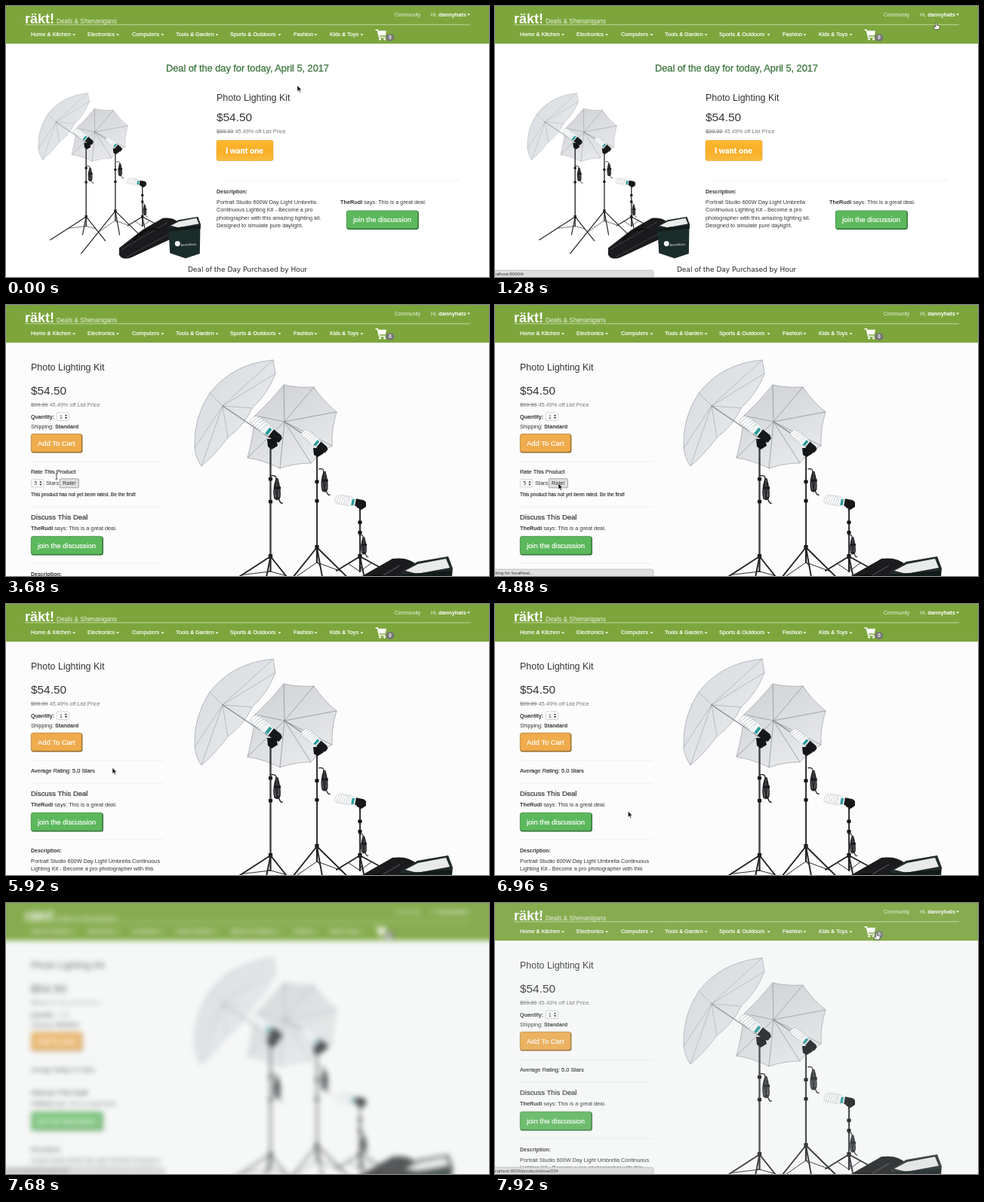
Animation, 640 px wide and 360 px high, one loop 8 s. Source, as an HTML page:

```html
<!DOCTYPE html>
<html lang="en">
<head>
<meta charset="utf-8">
<title>Deal of the day</title>
<style>
html, body { margin: 0; width: 100%; height: 100%; overflow: hidden; background: #fff; }
svg { display: block; width: 640px; height: 360px; }
text { font-family: "Liberation Sans", Arial, sans-serif; fill: #333; }
.b { font-weight: bold; }
.m { stroke: #333; stroke-width: .2; }
.w { fill: #fff; }
.wm { fill: #fff; stroke: #fff; stroke-width: .2; }
.mute { fill: #777; }
.hr { stroke: #e9e9e9; stroke-width: .7; }
</style>
</head>
<body>
<svg id="stage" viewBox="0 0 640 360" xmlns="http://www.w3.org/2000/svg"></svg>
<script>
const LOOP = 8000;
const HOST = 'localhost:8000';
const USER = 'dannyhats', POSTER = 'TheRudi', SHOP = 'räkt!';

const text = (x, y, size, str, cls = '', extra = '') =>
  `<text x="${x}" y="${y}" font-size="${size}" class="${cls}" ${extra}>${str}</text>`;
const bold = s => `<tspan class="b">${s}</tspan>`;
const mid = 'text-anchor="middle"';
const line = (x1, y1, x2, y2, color, w) =>
  `<path d="M${x1} ${y1}L${x2} ${y2}" stroke="${color}" stroke-width="${w}" fill="none" stroke-linecap="round"/>`;
const rule = (x1, x2, y) => `<path class="hr" d="M${x1} ${y}H${x2}"/>`;
const caret = x => `<path fill="#fff" d="M${x - 2} 37.2h4l-2 2.2z"/>`;

function button(x, y, w, h, fill, edge, label) {
  return `<rect x="${x + .4}" y="${y + .4}" width="${w}" height="${h}" rx="3" fill="${edge}"/>
    <rect x="${x + .2}" y="${y + .2}" width="${w - .9}" height="${h - .9}" rx="2.8" fill="${fill}" stroke="${edge}" stroke-width=".4"/>` +
    text(x + w / 2 - .2, y + h / 2 + 3.1, 9.45, label, 'wm', mid);
}
const joinButton = (x, y) => button(x, y, 95.5, 25, '#5cb85c', '#2f6b33', 'join the discussion');

function select(x, y, w, label) {
  const ax = x + w - 4;
  return `<rect x="${x}" y="${y}" width="${w}" height="10.5" rx="2" fill="#fff" stroke="#b5b5b5" stroke-width=".6"/>` +
    text(x + 4, y + 7.8, 6.8, label) +
    `<path fill="#333" d="M${ax - 1.6} ${y + 4.6}h3.2l-1.6-2.4zM${ax - 1.6} ${y + 6}h3.2l-1.6 2.4z"/>`;
}

// ---- product picture, in the large page's coordinates ----
function canopy(points, hub, pull, fill) {
  let d = `M${points[0]}`, ribs = '';
  points.forEach((p, i) => {
    const q = points[(i + 1) % points.length];
    const c = [0, 1].map(k => { const m = (p[k] + q[k]) / 2; return m + (hub[k] - m) * pull; });
    d += `Q${c} ${q}`;
    ribs += line(...hub, ...p, '#85898f', .7);
  });
  return `<path d="${d}Z" fill="${fill}" stroke="#a4a7ad" stroke-width=".8"/>${ribs}`;
}

function lamp(x, y, angle, size) {
  let coils = '';
  for (let i = 0; i < 6; i++) {
    const cx = -36 + i * 3.7;
    coils += `<ellipse cx="${cx}" cy="0" rx="2.6" ry="${i ? 8 : 6.5}" fill="#fff" stroke="#b9bfc4" stroke-width=".8" transform="rotate(14 ${cx} 0)"/>`;
  }
  return `<g transform="translate(${x} ${y}) rotate(${angle}) scale(${size})">${coils}
    <path d="M-18-8L-7-5V5L-18 8Z" fill="#f2f5f5" stroke="#c3c8cc" stroke-width=".5"/>
    <path d="M-13-4L-9-4V5L-13 6Z" fill="#2a9a9a"/>
    <path d="M-7-5.5H5L9-3V4L4 6H-7Z" fill="#17181a"/></g>`;
}

function stand(x, top, hub, legs) {
  return line(x, top, x, hub + 20, '#232427', 2.2) + line(x - .4, top + 8, x - .4, hub, '#707377', .6) +
    [.3, .5].map(k => {
      const y = top + (hub - top) * k;
      return `<rect x="${x - 2.6}" y="${y}" width="5.2" height="4.5" rx="1" fill="#141517"/>`;
    }).join('') +
    `<rect x="${x - 2.6}" y="${hub - 3}" width="5.2" height="6" fill="#141517"/>` +
    legs.map(p => line(x, hub, ...p, '#232427', 1.9) +
      line(x, hub + 20, x + (p[0] - x) * .5, hub + (p[1] - hub) * .5, '#2b2c2f', 1)).join('');
}

const cable = (x, y, s) => `<g transform="translate(${x} ${y}) scale(${s})" fill="none" stroke="#1a1b1d" stroke-width="1.3">
  <path d="M-8-18Q0-20-1-12"/><path d="M-1-14Q-6 0-3 12Q2 16 4 10Q5 0 1-14Z" fill="#55575a"/>
  <path d="M-1-12Q-3 2 1 12M1-10Q2 4-1 13M2 10Q4 20 8 18"/><path d="M-4-2h9" stroke-width="3.500"/></g>`;

const picture = `
  ${canopy([[368, 106], [408, 109], [438, 142], [432, 187], [404, 210], [363, 217], [320, 203], [330, 147]], [369, 155], .06, 'url(#shadeB)')}
  <path d="M354 73Q300 78 270 117Q248 150 250 190Q252 205 259 214Q278 198 294 176Q316 160 326 137Q347 118 357 91Z"
    fill="url(#shadeA)" stroke="#a8abb1" stroke-width=".8"/>
  ${[[354, 73], [357, 91], [326, 137], [294, 176], [259, 214], [250, 190], [270, 117]].map(p => line(287, 134, ...p, '#9b9fa5', .6)).join('')}
  ${line(287, 134, 352, 178, '#85898f', 1.3)}${line(369, 155, 412, 184, '#85898f', 1.3)}
  ${stand(469, 266, 334, [[438, 353], [500, 351], [474, 358]])}
  ${stand(350.5, 184, 334, [[275, 383], [391, 385], [343, 372]])}
  ${stand(412, 194, 322, [[340, 412], [477, 386], [421, 372]])}
  <path d="M346 178h12l2 9-8 5-5-4zM407 190h12l2 7-8 5-5-3z" fill="#141517"/>
  <path d="M463 262h14l0 6-6 4-6-3z" fill="#141517"/>
  ${lamp(357, 174, 38, 1)}${lamp(419, 189, 40, .85)}${lamp(469, 263, 10, .85)}
  ${cable(359, 245, 1)}${cable(422, 235, .95)}${cable(474, 320, .8)}
  <path d="M420 400L470 361 512 337Q534 334 545 346L536 378 446 420Q426 427 420 414Z" fill="#1b1b1d"/>
  <path d="M424 404L522 346M436 419L534 366" stroke="#4c4d50" stroke-width="1.2" fill="none"/>
  <path d="M450 384Q478 352 505 362" stroke="#0c0c0d" stroke-width="3" fill="none"/>
  <path d="M524 354L545 341 586 334 592 350 591 360 525 362Z" fill="#232a2a"/>
  <path d="M529 353L546 344 583 337 588 349 545 357Z" fill="#e9eaea"/>
  <path d="M524 358L591 353 590 412 560 422 527 411Z" fill="#1b2d2b"/>
  <path d="M524 358L591 353V359L525 365Z" fill="#111b1a"/>
  <circle cx="543" cy="391" r="5.5" fill="#f4f6f6"/>
  ${text(550, 396, 6.2, 'BentoWicks', 'w', 'transform="rotate(-3 550 396)"')}`;

// ---- page parts ----
const menu = [['Home &amp; Kitchen', 33, 90], ['Electronics', 108, 148], ['Computers', 167, 207.5],
  ['Tools &amp; Garden', 225, 279.5], ['Sports &amp; Outdoors', 297, 362.5], ['Fashion', 381, 410.5], ['Kids &amp; Toys', 429, 471.5]];

const header = `<rect x="-40" y="-40" width="720" height="90" fill="#7ca63c"/>
  ${text(25, 23.2, 18, SHOP, 'b w')}
  ${text(67, 23.2, 8.3, 'Deals &amp; Shenanigans', 'w', 'fill-opacity=".85"')}
  <path d="M25 24.8H615" stroke="#fff" stroke-width=".7" stroke-opacity=".75"/>
  ${text(515, 14, 6.75, 'Community', 'w', 'fill-opacity=".85"')}
  ${text(563, 14, 6.8, 'Hi,', 'w', 'fill-opacity=".85"')}${text(573.3, 14, 7.3, USER, 'b w')}
  <path fill="#fff" d="M611 10.6h4l-2 2.2z"/>
  ${menu.map(([s, x, c]) => text(x, 40.4, 7.33, s, 'wm') + caret(c)).join('')}
  <path d="M489.5 31.8h2.8l2.3 9.6h8.2" fill="none" stroke="#fff" stroke-width="1.5"/>
  <path d="M492.6 32.8H504L502.8 39.2H494.2Z" fill="#fff"/>
  <circle cx="495.6" cy="44" r="1.5" fill="#fff"/><circle cx="501.6" cy="44" r="1.5" fill="#fff"/>
  <rect x="503.5" y="37.2" width="11" height="9.6" rx="4.8" fill="#777"/>
  ${text(509, 44.3, 6.4, '0', 'b w', mid)}`;

const oldPrice = (x, y) => text(x, y, 7.33, '<tspan text-decoration="line-through">$99.99</tspan> 45.49% off List Price', 'mute');
const says = (x, y) => text(x, y, 7.3, `${bold(POSTER)} says: This is a great deal.`);
const lines = (x, y, step, rows) => rows.map((s, i) => text(x, y + i * step, 7.33, s)).join('');

const dealPage = `
  ${text(320, 87.4, 12.75, 'Deal of the day for today, April 5, 2017', '', mid + ' style="fill:#3c763d;stroke:#3c763d;stroke-width:.3"')}
  <g transform="scale(.629) translate(-181.7 111)">${picture}</g>
  ${text(279, 126.3, 12.45, 'Photo Lighting Kit')}
  ${text(279, 153.2, 15.4, '$54.50')}
  ${oldPrice(279, 169.4)}
  <rect x="279" y="178.5" width="75" height="27" rx="2" fill="url(#gold)" stroke="#e9a02c" stroke-width="1" stroke-dasharray="1.5 1"/>
  <text x="316" y="195.6" font-size="10.6" text-anchor="middle" style="font-family:Lato,sans-serif;font-weight:900;fill:#fff">I want one</text>
  ${rule(288, 600, 232)}
  ${text(279, 249, 7, 'Description:', 'b')}
  ${lines(279, 263, 10.45, ['Portrait Studio 600W Day Light Umbrella', 'Continuous Lighting Kit - Become a pro',
    'photographer with this amazing lighting kit.', 'Designed to simulate pure daylight.'])}
  ${says(443, 263)}
  ${joinButton(451, 271.5)}
  <text x="320" y="352.6" font-size="9" text-anchor="middle" style="font-family:'DejaVu Sans',sans-serif;fill:#222">Deal of the Day Purchased by Hour</text>`;

const productPage = `
  <g>${picture}</g>
  ${text(33, 87.3, 12.45, 'Photo Lighting Kit')}
  ${text(33, 119.2, 15.4, '$54.50')}
  ${oldPrice(33, 135)}
  ${text(33, 150.6, 7.1, 'Quantity:', 'b')}${select(67, 143, 16.5, '1')}
  ${text(33, 163.6, 7.2, 'Shipping: ' + bold('Standard'))}
  ${button(33, 171, 68, 25, '#efab4c', '#8a6426', 'Add To Cart')}
  ${rule(33, 209, 208)}
  <g id="unrated">
    ${text(33, 224, 7.45, 'Rate This Product', 'm')}
    ${select(33.4, 231.5, 16.5, '5')}${text(53, 239.4, 7.3, 'Stars')}
    <rect x="71.3" y="230.8" width="25" height="12" rx="1" fill="#e2e2e2" stroke="#8d8d8d" stroke-width=".8"/>
    ${text(83.8, 239.4, 7.3, 'Rate!', '', mid)}
    ${text(33, 254, 6.5, 'This product has not yet been rated. Be the first!', 'm')}
  </g>
  <g id="rated">${text(33, 224, 7.42, 'Average Rating: 5.0 Stars', 'm')}</g>
  <g id="lower">
    ${rule(33, 209, 238)}
    ${text(33, 254.6, 9.45, 'Discuss This Deal', 'm')}
    ${says(33, 269)}
    ${joinButton(33, 277)}
    ${rule(33, 209, 313)}
    ${text(33, 329.6, 7, 'Description:', 'b')}
    ${lines(33, 343.6, 10.45, ['Portrait Studio 600W Day Light Umbrella Continuous',
      'Lighting Kit - Become a pro photographer with this', 'amazing lighting kit. Designed to simulate pure'])}
  </g>`;

document.getElementById('stage').innerHTML = `
  <defs>
    <linearGradient id="shadeA" x1="0" y1="0" x2="1" y2="1"><stop offset="0" stop-color="#d6d9de"/><stop offset="1" stop-color="#eceef0"/></linearGradient>
    <linearGradient id="shadeB" x1="0" y1="0" x2=".6" y2="1"><stop offset="0" stop-color="#cdcfd3"/><stop offset="1" stop-color="#e8e9eb"/></linearGradient>
    <linearGradient id="gold" x1="0" y1="0" x2="0" y2="1"><stop offset="0" stop-color="#fdb92f"/><stop offset=".5" stop-color="#f9ad27"/><stop offset="1" stop-color="#fbbb3e"/></linearGradient>
  </defs>
  <g id="screen">
    <rect id="paper" x="-40" y="-40" width="720" height="440"/>
    <g id="content"><g id="deal">${dealPage}</g><g id="product">${productPage}</g></g>
    ${header}
    <g id="status">
      <path d="M-5 351H207.500Q210 351 210 353.500V366H-5Z" fill="#dedede" stroke="#b4b4b4" stroke-width=".7"/>
      <text id="statusText" y="358" font-size="6.1" text-anchor="end"></text>
    </g>
    <g id="pointer">
      <path id="arrow" d="M0 0V8L1.900 6.300 3.200 9.200 4.500 8.600 3.200 5.800H5.600Z" fill="#111" stroke="#fff" stroke-width=".5"/>
      <path id="hand" d="M-.9 0Q0-1.200.9 0V3L3.800 3.600Q5 4 4.800 5.200L4 8.800H-1.400L-3.600 5.200Q-3.400 4-2.200 4.700L-.9 5.600Z" fill="#fff" stroke="#222" stroke-width=".7"/>
      <path id="beam" d="M-1.500-3.500Q0-3.500 0-2.500Q0-3.500 1.500-3.500M0-2.500V3M-1.500 4Q0 4 0 3Q0 4 1.500 4" fill="none" stroke="#222" stroke-width=".8"/>
    </g>
    <rect id="wash" x="-40" y="-40" width="720" height="440" fill="#cdd4d1"/>
  </g>`;

// ---- motion ----
const el = id => document.getElementById(id);
const show = (id, on) => { el(id).style.display = on ? '' : 'none'; };
const inside = ([x, y], [l, t, w, h]) => x >= l && x <= l + w && y >= t && y <= t + h;

const OPEN = 2720, RATE = 5080, BLUR_FROM = 7120, BLUR_TO = LOOP;
const SWAP = (BLUR_FROM + BLUR_TO) / 2;
const path = [[180, 386, 105.5], [820, 584.5, 22.5], [1450, 584.5, 22.5], [2150, 325.5, 196.5], [2850, 325.5, 196.5],
  [3640, 67, 227.5], [3760, 67, 227.5], [4350, 84, 237], [5150, 84, 237], [5800, 141, 217.5], [6250, 141, 217.5], [7200, 183, 286]];

function pointerAt(t) {
  if (t >= SWAP) return [505.5, 40];
  const i = path.findIndex(k => k[0] > t);
  if (i === 0) return path[0].slice(1);
  if (i < 0) return path[path.length - 1].slice(1);
  const a = path[i - 1], b = path[i];
  const u = (t - a[0]) / (b[0] - a[0]), e = u * u * (3 - 2 * u);
  return [a[1] + (b[1] - a[1]) * e, a[2] + (b[2] - a[2]) * e];
}

// [left, top, width, height, address]
const navLinks = [[560, 6, 57, 20, '/#'], [488, 30, 28, 18, '/product/show/22#']];
const dealLinks = [[279, 178, 75, 28, '/product/show/22']];

function render(t) {
  const product = t >= OPEN, rated = t >= RATE;
  show('deal', !product);
  show('product', product);
  show('unrated', !rated);
  show('rated', rated);
  el('paper').setAttribute('fill', product ? '#fcfcfc' : '#fff');
  el('lower').setAttribute('transform', `translate(0 ${rated ? 0 : 30})`);

  const p = pointerAt(t);
  const link = navLinks.concat(product ? [] : dealLinks).find(r => inside(p, r));
  const beam = product && !rated && inside(p, [33, 217, 60, 12]);
  show('hand', !!link);
  show('beam', beam);
  show('arrow', !link && !beam);
  el('pointer').setAttribute('transform', `translate(${p})`);

  const waiting = (t > 2320 && t < OPEN) || (t > 4640 && t < RATE);
  const label = waiting ? 'Waiting for localhost...' : link ? HOST + link[4] : '';
  show('status', label);
  el('statusText').textContent = label;
  el('statusText').setAttribute('x', waiting ? 51 : link && link[4] === '/#' ? 38 : 84);

  const u = Math.max(0, (t - BLUR_FROM) / (BLUR_TO - BLUR_FROM));
  const soft = Math.sin(Math.PI * u) ** 1.5;
  el('screen').style.filter = u ? `blur(${(4.4 * soft).toFixed(2)}px)` : 'none';
  el('content').style.opacity = 1 - .2 * soft;
  el('wash').style.opacity = .12 * Math.min(1, u * 4);
}

const start = performance.now();
function tick() {
  render((performance.now() - start) % LOOP);
  requestAnimationFrame(tick);
}
tick();
</script>
</body>
</html>
```
